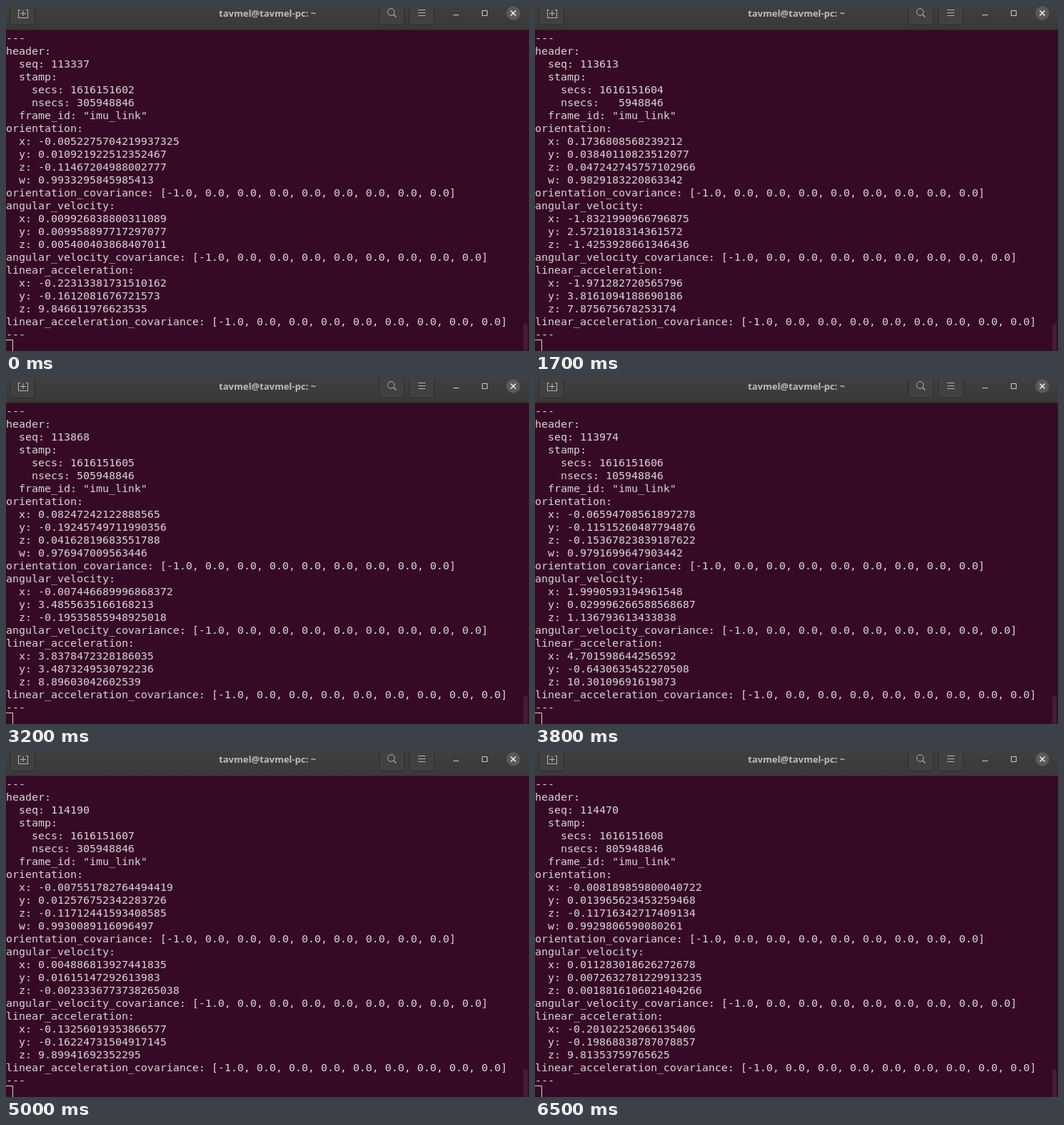
These frames come from a looping animation (732x482 px, 6600 ms). An HTML page with a canvas:

```html
<!DOCTYPE html>
<html lang="en">
<head>
<meta charset="utf-8">
<title>Terminal</title>
<style>
  html, body { margin: 0; width: 100%; height: 100%; overflow: hidden; background: #360a26; }
  canvas { position: absolute; left: 0; top: 0; }
  #title {
    position: absolute; left: 266px; top: 0; width: 200px; white-space: pre;
    text-align: center; color: #bcbcbc;
    font: bold 13px/20px "Noto Sans", "Open Sans", sans-serif;
  }
  #out {
    position: absolute; left: 0; top: 36px; margin: 0; color: #d9d3d7;
    font: 14.95px/18px "DejaVu Sans Mono", "Noto Sans Mono", monospace;
  }
</style>
</head>
<body>
<canvas id="stage" width="732" height="482"></canvas>
<div id="title">tavmel@tavmel-pc: ~</div>
<pre id="out"></pre>
<script>
const LOOP = 6600, STEP = 100;

// The sensor rests, is shaken through three poses, and rests again.
const TIMES = [0, 1700, 2700, 3800, 4500, LOOP];
const POSES = [0, 1, 2, 3, 0, 0];

// Each axis: value at rest, then in the three poses.
const orientation = {
  drift: 0.002, swing: 0.1,
  axes: [[-0.007, 0.175, 0.361, -0.066], [0.012, 0.04, -0.358, -0.114], [-0.116, 0.046, 0.091, -0.154]]
};
const velocity = {
  drift: 0.006, swing: 1.5,
  axes: [[0.008, -1.83, 0.941, 2], [0.012, 2.57, 4.53, 0.03], [0.002, -1.43, -2.67, 1.14]]
};
const acceleration = {
  drift: 0.06, swing: 2,
  axes: [[-0.17, -1.95, 6.56, 4.69], [-0.16, 3.82, 4.48, -0.68], [9.87, 7.84, 5.8, 10.32]]
};

function noise(seed) {
  const s = Math.sin(seed * 12.9898) * 43758.5453;
  return (s - Math.floor(s)) * 2 - 1;
}

function read({ drift, swing, axes }, ms) {
  const k = TIMES.findLastIndex(t => t <= ms);
  const u = (ms - TIMES[k]) / (TIMES[k + 1] - TIMES[k]);
  const ease = u * u * (3 - 2 * u);
  const shake = POSES[k] || POSES[k + 1] ? swing * Math.sin(Math.PI * u) : 0;
  return axes.map((axis, i) => {
    const from = axis[POSES[k]], to = axis[POSES[k + 1]];
    return from + (to - from) * ease
      + shake * Math.sin(ms * 0.0055 + i * 1.9)
      + drift * noise(ms / STEP + i * 97 + swing);
  });
}

const covariance = "[-1.0" + ", 0.0".repeat(8) + "]";
// single precision readings printed as doubles give the long digits
const rows = values => values.map((v, i) => `  ${"xyzw"[i]}: ${Math.fround(v)}`);

function message(ms) {
  const s = ms / 1000;
  const clock = 2305948846 + ms * 1e6;
  const q = read(orientation, ms);
  const w = Math.sqrt(1 - q.reduce((sum, v) => sum + v * v, 0));
  return [
    "---",
    "header:",
    "  seq: " + Math.round(113337 + s * (158 + 2.5 * s)),
    "  stamp:",
    "    secs: " + (1616151600 + Math.floor(clock / 1e9)),
    "    nsecs: " + String(clock % 1e9).padStart(9),
    '  frame_id: "imu_link"',
    "orientation:", ...rows([...q, w]),
    "orientation_covariance: " + covariance,
    "angular_velocity:", ...rows(read(velocity, ms)),
    "angular_velocity_covariance: " + covariance,
    "linear_acceleration:", ...rows(read(acceleration, ms)),
    "linear_acceleration_covariance: " + covariance,
    "---"
  ].join("\n");
}

const ctx = document.getElementById("stage").getContext("2d");

function line(color, width, ...points) {
  ctx.strokeStyle = color;
  ctx.lineWidth = width;
  ctx.beginPath();
  for (let i = 0; i < points.length; i += 4) {
    ctx.moveTo(points[i], points[i + 1]);
    ctx.lineTo(points[i + 2], points[i + 3]);
  }
  ctx.stroke();
}

function box(x, y, w, h, r, fill, stroke) {
  ctx.beginPath();
  ctx.roundRect(x, y, w, h, r);
  ctx.lineWidth = 1;
  if (fill) { ctx.fillStyle = fill; ctx.fill(); }
  if (stroke) { ctx.strokeStyle = stroke; ctx.stroke(); }
}

function disc(x, y, r) {
  ctx.beginPath();
  ctx.arc(x, y, r, 0, 2 * Math.PI);
}

function drawWindow() {
  const ink = "#b4b4b4";
  box(0, 0, 732, 482, 0, "#360a26");
  const bar = ctx.createLinearGradient(0, 0, 0, 33);
  bar.addColorStop(0, "#3f3f3f");
  bar.addColorStop(1, "#393939");
  box(0, 0, 732, 33, 0, bar);
  box(0, 33, 732, 1, 0, "#262224");
  for (const x of [5.5, 522.5, 564.5]) box(x, -8.5, 35, 35, 4, "#414141", "#2b2b2b");

  // new tab
  line(ink, 1, 20, 5.5, 17, 5.5, 17.5, 5, 17.5, 17, 17, 16.5, 31, 16.5,
    30.5, 17, 30.5, 5, 31, 5.5, 28, 5.5);
  line(ink, 1, 24, 6, 24, 14, 20, 10.5, 28, 10.5);

  // search
  disc(539, 8.5, 4.8);
  ctx.strokeStyle = ink;
  ctx.stroke();
  line(ink, 1.1, 542.5, 12, 546, 15.5);

  // menu
  for (const y of [5.5, 9.5, 13.5]) line(ink, 1, 577, y, 587, y);

  // window controls
  line("#cccccc", 1, 626, 12.5, 634, 12.5);
  box(666.5, 6.5, 7, 7, 0, null, "#cccccc");
  disc(710, 10, 9.7);
  ctx.fillStyle = "#5a5a5a";
  ctx.fill();
  line("#f0f0f0", 1.5, 706.5, 6.5, 713.5, 13.5, 713.5, 6.5, 706.5, 13.5);

  // scrollbar and cursor
  box(724, 443, 6, 46, 3, "#451c36");
  box(-0.5, 466.5, 10, 17, 0, null, "#d9d3d7");
}

const out = document.getElementById("out");
let shown = -1;

function tick() {
  const step = Math.floor((performance.now() % LOOP) / STEP);
  if (step !== shown) {
    out.textContent = message(step * STEP);
    shown = step;
  }
  requestAnimationFrame(tick);
}

drawWindow();
tick();
</script>
</body>
</html>
```
